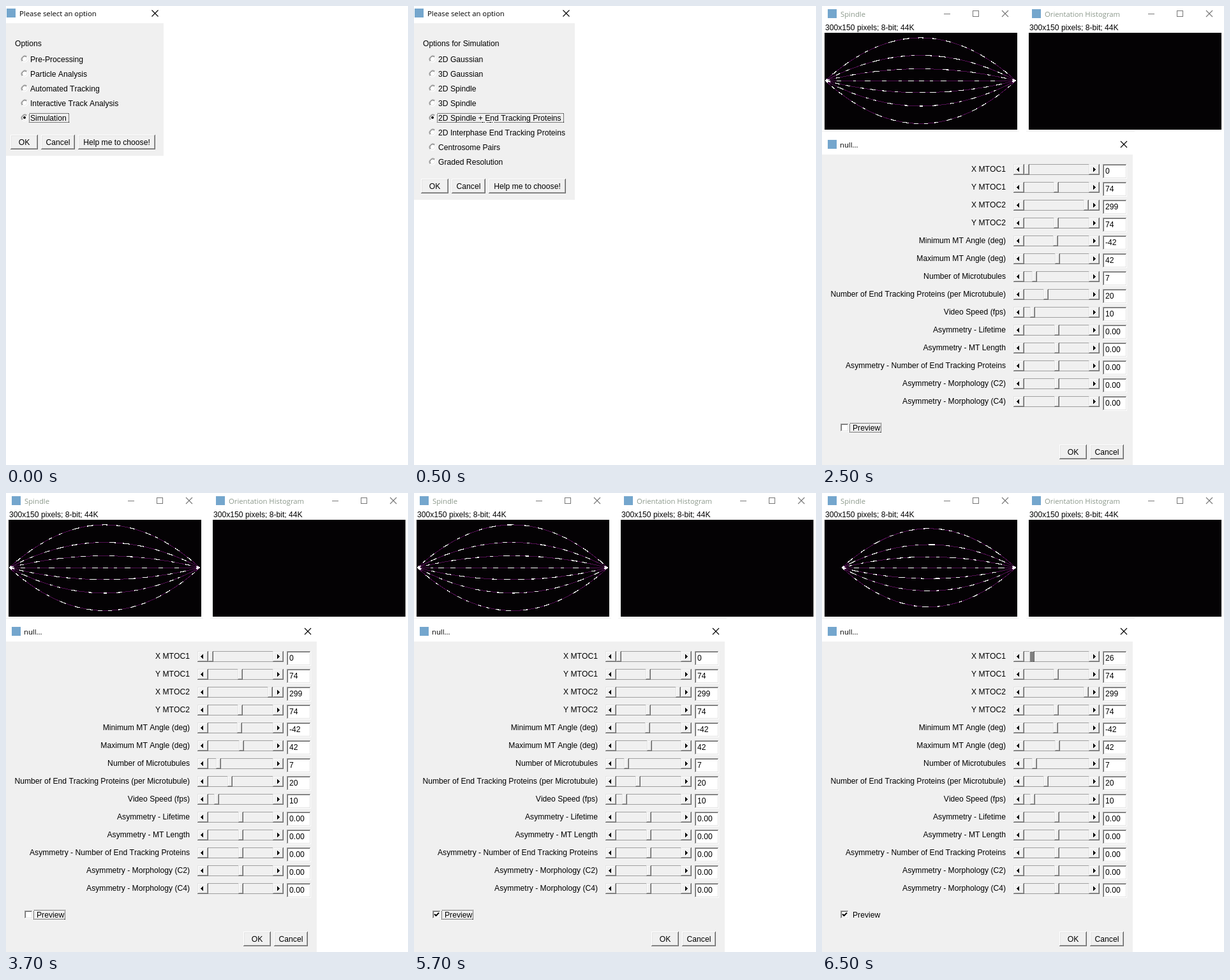
Write an HTML page that moves like this. It is 630 by 720 pixels and loops after 8 s.

```html
<!DOCTYPE html>
<html lang="en">
<head>
<meta charset="utf-8">
<title>Spindle simulation dialogs</title>
<style>
html, body { margin: 0; width: 100%; height: 100%; overflow: hidden; background: #fff; }
svg { display: block; width: 630px; height: 720px; shape-rendering: crispEdges; }
text { font: 12.15px "Liberation Sans", Arial, sans-serif; font-kerning: none; white-space: pre; }
.title { font: 11.3px "Open Sans", "Noto Sans", sans-serif; }
.smooth { shape-rendering: geometricPrecision; }
</style>
</head>
<body>
<svg id="stage" viewBox="0 0 630 720"></svg>
<script>
const FACE = '#f0f0f0', LIGHT = '#e3e3e3', MID = '#a0a0a0', DARK = '#696969';

const rect = (x, y, w, h, fill) => `<rect x="${x}" y="${y}" width="${w}" height="${h}" fill="${fill}"/>`;
const path = (d, attrs) => `<path d="${d}" fill="none" ${attrs}/>`;
const text = (x, y, s, attrs = '') => `<text x="${x}" y="${y}" ${attrs}>${s}</text>`;
const title = (x, y, s, fill = '#000') => text(x, y, s, `class="title" fill="${fill}"`);
const icon = (x, y) => rect(x, y, 14, 14, '#74a6cd');

// Two nested one-pixel edges around a filled box
function bevel(x, y, w, h, fill, [tl, br, tl2, br2]) {
  return rect(x, y, w, h, br) + rect(x, y, w - 1, h - 1, tl) +
    rect(x + 1, y + 1, w - 2, h - 2, br2) + rect(x + 1, y + 1, w - 3, h - 3, tl2) +
    rect(x + 2, y + 2, w - 4, h - 4, fill);
}
const raised = (x, y, w, h) => bevel(x, y, w, h, FACE, ['#fff', DARK, LIGHT, MID]);
const knob = (x, y, w, h) => bevel(x, y, w, h, FACE, [LIGHT, DARK, '#fff', MID]);
const sunken = (x, y, w, h) => bevel(x, y, w, h, '#fff', [MID, '#fff', DARK, LIGHT]);

const button = (x, y, w, label) =>
  raised(x, y, w, 23) + text(x + w / 2, y + 16, label, 'text-anchor="middle"');

const focus = (x, y, w, h) =>
  path(`M${x + .5} ${y + .5}h${w}v${h}h${-w}z`, 'stroke="#000" stroke-dasharray="1 1"');

const cross = (x, y, color = '#000') =>
  path(`M${x - 5} ${y - 5}l10 10m0 -10l-10 10`, `class="smooth" stroke="${color}" stroke-width="1.1"`);

function radio(x, y, on) {
  const arc = (r, sweep, color) =>
    path(`M${x - r * .7} ${y + r * .7}A${r} ${r} 0 0 ${sweep} ${x + r * .7} ${y - r * .7}`, `stroke="${color}"`);
  return `<g class="smooth"><circle cx="${x}" cy="${y}" r="5.5" fill="#fff"/>` +
    arc(5.5, 1, MID) + arc(4.5, 1, DARK) + arc(5.5, 0, '#fff') + arc(4.5, 0, LIGHT) +
    (on ? `<circle cx="${x}" cy="${y}" r="2"/>` : '') + '</g>';
}

function chooser(w, h, heading, options, chosen, focusWidth, bx) {
  const by = h - 33;
  return rect(0, 27, w, h - 27, FACE) + icon(1, 4) +
    title(21, 16, 'Please select an option') + cross(w - 13.5, 11.5) + text(14, 63, heading) +
    options.map((s, i) => radio(29, 83 + 23 * i, i === chosen) + text(38, 88 + 23 * i, s)).join('') +
    focus(36, 168, focusWidth, 14) +
    button(bx, by, 43, 'OK') + button(bx + 48, by, 53, 'Cancel') +
    button(bx + 106, by, 121, 'Help me to choose!');
}

function imageWindow(x, name, edge) {
  const c = '#777';
  return icon(x + 9, 5) + title(x + 29, 17, name, '#8c998c') +
    path(`M${x + 191} 12.5h10M${x + 236.5} 7.5h9v9h-9z`, `stroke="${c}"`) + cross(x + 287, 12, c) +
    text(x + 5, 38, '300x150 pixels; 8-bit; 44K') + rect(x + 4, 42, 302, 152, '#040204') +
    rect(x, 196, edge, 1, FACE);
}

function random(seed) {
  return () => (seed = seed * 16807 % 2147483647) / 2147483647;
}

// Parabolic microtubules leaving the pole at -42..42 degrees
function spindle(x1, seed) {
  const rnd = random(seed), x = 5 + x1, span = 299 - x1;
  let out = '';
  for (let deg = -42; deg <= 42; deg += 14) {
    const slope = Math.tan(deg * Math.PI / 180), len = span * (1 + slope * slope / 6);
    const d = `M${x} 117.2q${span / 2} ${span / 2 * slope} ${span} 0`;
    const dashes = [4 + 5 * rnd()];
    let sum = dashes[0];
    while (sum < len - 36) {
      const gap = 7 + 12 * rnd(), dash = 4 + 7 * rnd();
      dashes.push(gap, dash);
      sum += gap + dash;
    }
    dashes.push(len - sum - 6, 6, 400);
    out += path(d, 'stroke="#500f50"') +
      path(d, `stroke="#fff" stroke-width="1.2" stroke-dasharray="${dashes.map(n => n.toFixed(1)).join(' ')}"`);
  }
  return out;
}

// label, value, thumb position
const SETTINGS = [
  ['X MTOC1', 0, 317], ['Y MTOC1', 74, 363], ['X MTOC2', 299, 410], ['Y MTOC2', 74, 363],
  ['Minimum MT Angle (deg)', -42, 362], ['Maximum MT Angle (deg)', 42, 365],
  ['Number of Microtubules', 7, 329], ['Number of End Tracking Proteins (per Microtubule)', 20, 347],
  ['Video Speed (fps)', 10, 326],
  ...['Lifetime', 'MT Length', 'Number of End Tracking Proteins', 'Morphology (C2)', 'Morphology (C4)']
    .map(s => ['Asymmetry - ' + s, '0.00', 364]),
];

function slider(y, thumb, pressed) {
  const arrow = (x, dir) => `<path d="M${x} ${y + 8.5}l${4 * dir} -4v8z"/>`;
  return rect(300, y, 135, 17, MID) + rect(317, y + 1, 101, 15, FACE) +
    knob(300, y, 17, 17) + arrow(305, 1) + knob(418, y, 17, 17) + arrow(429, -1) +
    knob(thumb, y, 8, 17) + (pressed ? rect(thumb + 1, y + 1, 6, 15, 'url(#checker)') : '');
}

function simulator(x1, seed, checked, focused) {
  const dragged = x1 > 0;
  const rows = SETTINGS.map(([label, value, thumb], i) => {
    const y = 248 + 28 * i, active = dragged && i === 0;
    return text(288, y + 12, label, 'text-anchor="end"') +
      slider(y, active ? 325 : thumb, active) +
      sunken(440, y, 38, 23) + text(444, y + 15, active ? x1 : value);
  }).join('');
  return '<defs><pattern id="checker" width="2" height="2" patternUnits="userSpaceOnUse">' +
    rect(0, 0, 2, 2, '#fff') + rect(0, 0, 1, 1, '#000') + rect(1, 1, 1, 1, '#000') + '</pattern></defs>' +
    imageWindow(0, 'Spindle', 309) + imageWindow(320, 'Orientation Histogram', 170) + spindle(x1, seed) +
    rect(0, 233, 487, 487, FACE) + icon(9, 210) + title(28, 222, 'null...') + cross(473, 217) + rows +
    sunken(29, 655, 13, 13) +
    (checked ? path('M32 660.5l2.5 2.5l4.5 -4.5', 'class="smooth" stroke="#000" stroke-width="2"') : '') +
    text(48, 666, 'Preview') + (focused ? focus(43, 654, 49, 14) : '') +
    button(372, 688, 43, 'OK') + button(420, 688, 53, 'Cancel');
}

const scenes = [
  [0, chooser(247, 235, 'Options', ['Pre-Processing', 'Particle Analysis', 'Automated Tracking',
    'Interactive Track Analysis', 'Simulation'], 4, 62, 7)],
  [500, chooser(252, 304, 'Options for Simulation', ['2D Gaussian', '3D Gaussian', '2D Spindle', '3D Spindle',
    '2D Spindle + End Tracking Proteins', '2D Interphase End Tracking Proteins', 'Centrosome Pairs',
    'Graded Resolution'], 4, 198, 11)],
  [2500, simulator(0, 71, false, true)],
  [4500, simulator(0, 502, true, true)],
  [6500, simulator(26, 913, true, false)],
];

const stage = document.getElementById('stage');
const start = performance.now();
let shown;
function draw(now) {
  const t = Math.max(0, now - start) % 8000;
  const scene = scenes.filter(([from]) => from <= t).pop();
  if (scene !== shown) stage.innerHTML = (shown = scene)[1];
  requestAnimationFrame(draw);
}
draw(start);
</script>
</body>
</html>
```
